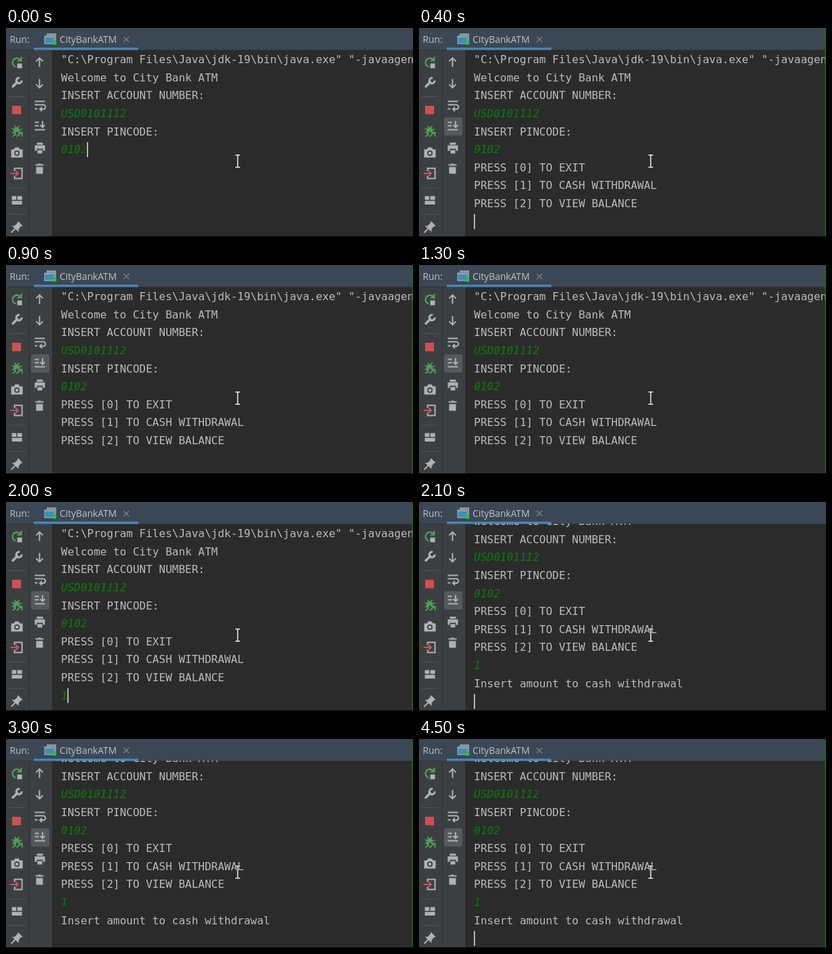
An HTML page that plays this animation: 600x309 px, repeating every 5 s.

```html
<!DOCTYPE html>
<html lang="en">
<head>
<meta charset="utf-8">
<title>Console run</title>
<style>
  html, body { margin: 0; width: 100%; height: 100%; overflow: hidden; background: #2b2b2b; }
  svg { display: block; width: 600px; height: 309px; }
  .ui { font: 13.8px "Open Sans", "Noto Sans", sans-serif; fill: #bfc1c3; }
  #lines text { font: 16px "DejaVu Sans Mono", monospace; fill: #bbb; white-space: pre; }
  #lines .input { font-style: italic; fill: #087d08; }
  .icon { fill: none; stroke: #afb1b3; stroke-width: 2; }
  .icon .solid { fill: #afb1b3; stroke: none; }
  .icon .green { stroke: #4f9d57; }
  .icon .greenFill { fill: #4f9d57; stroke: none; }
  .icon .red { stroke: #cf5356; }
  .icon .hole { fill: #3c3f41; stroke: none; }
</style>
</head>
<body>
<svg viewBox="0 0 600 309">
  <defs>
    <clipPath id="consoleArea"><path d="M68 32H600V308H68z"/></clipPath>
  </defs>
  <path fill="#2b2b2b" d="M0 0H600V309H0z"/>
  <path fill="#3b4754" d="M0 0H600V32H0z"/>
  <path fill="#3c3f41" d="M0 32H68V309H0z"/>
  <path fill="#323436" d="M0 32H600V33H0zM34 33H35V309H34z"/>
  <path fill="#4a83b8" d="M41 29H195V32.500H41z"/>
  <path fill="#515456" d="M4 101H28V102H4zM4 236.500H28V237.500H4zM4 275H28V276H4z"/>

  <text class="ui" x="5.500" y="21.800">Run:</text>
  <text class="ui" x="79" y="21.800">CityBankATM</text>
  <path stroke="#7c838a" stroke-width="1.2" d="M173.500 13l8 8M181.500 13l-8 8"/>
  <g class="icon">
    <path class="solid" fill-opacity=".75" d="M60 8H74V19H72V11H60z"/>
    <path fill="#3d8fb3" stroke="#93a4ae" stroke-width="1.3" d="M57 12H71V23H57z"/>
    <path stroke="#93a4ae" d="M57 13H71"/>
    <circle cx="71.500" cy="22" r="3" fill="#1fc93a" stroke="none"/>
  </g>

  <!-- run toolbar -->
  <g class="icon" transform="translate(.6 -.5)">
    <path class="green" stroke-width="2.300" d="M20 47A6.500 6.500 0 1 0 14 58"/>
    <path class="greenFill" d="M23 42V50H15z"/>
    <path class="solid" d="M16 53H23V60H16z"/>

    <path stroke-width="3.500" stroke-linecap="round" d="M9.500 87L16 80.500"/>
    <path stroke-width="3" d="M19.500 74.500A4 4 0 1 0 22.500 78"/>

    <path fill="#cf5053" stroke="none" d="M8.500 115.500H21.500V128H8.500z"/>

    <path class="green" stroke-width="1.700" d="M8 149l4 2M8 155h4M9 161l4-3M12 145l2 3M19 145l-2 3M23 150l-4 1"/>
    <ellipse class="greenFill" cx="15" cy="153.500" rx="4.800" ry="6.500"/>
    <path class="hole" d="M14 154H24V163H14z"/>
    <path class="green" d="M15 161l7-6M17 155h6v6"/>

    <path class="solid" d="M7 180h4l2-3h5l2 3h4v12H7z"/>
    <circle class="hole" cx="15.500" cy="185.500" r="4"/>
    <circle class="solid" cx="15.500" cy="185.500" r="2.300"/>

    <path d="M12 212V208H23V223H12V219"/>
    <path class="red" d="M6 215.500H17M13.500 211.500l4 4l-4 4"/>

    <path class="solid" d="M8 249h6.500v5.500H8zM16 249h7v5.500h-7zM8 256h15v5.500H8z"/>

    <path class="solid" d="M17 286l7 7l-3 1l-3 4v4l-10-9h4l4-4z"/>
    <path stroke-width="1.800" d="M13 297l-6 6"/>
  </g>

  <!-- console toolbar -->
  <path id="followHighlight" fill="#55595b" d="M40 132H61a3 3 0 0 1 3 3V156a3 3 0 0 1-3 3H40a3 3 0 0 1-3-3V135a3 3 0 0 1 3-3z"/>
  <g class="icon" transform="translate(-.6 -.6)">
    <path d="M50 58V45M45 50l5-5l5 5"/>
    <path d="M50 76V89M45 84l5 5l5-5"/>
    <path d="M43 109H58M43 114H55.500a3.300 3.300 0 0 1 0 6.600H51M43 120H47M53.500 117.500l-3 3.100l3 3"/>
    <path d="M43 140H49M43 145H49M43 151H58M54.500 138V147M51 144l3.500 3.500l3.500-3.500"/>
    <path class="solid" d="M46 170h9v3h-9zM43 174h15v8h-3v-3h-9v3h-3zM47 181h7v5h-7z"/>
    <path class="solid" d="M48 201h4v1h4v2.200H44V202h4zM45 206h10v10H45z"/>
  </g>

  <g clip-path="url(#consoleArea)">
    <g id="scroller">
      <g id="lines"></g>
      <path id="caret" stroke="#d8d8d8" stroke-width="1.600" d="M.5-11V11"/>
    </g>
  </g>

  <g id="pointer" fill="none" transform="translate(.6 -.8)">
    <path stroke="#222" stroke-width="3" d="M337.500 188.500h7M341 189V206M337.500 206.500h7"/>
    <path stroke="#eee" stroke-width="1.600" d="M337.500 188.500h7M341 189V206M337.500 206.500h7"/>
  </g>
  <path fill="#050505" d="M0 308H600V309H0z"/>
  <path id="edge" fill="#0a760a" d="M598.500 0H600V308H598.500z"/>
</svg>
<script>
const LOOP = 5000, PITCH = 26.6, LEFT = 81, ADVANCE = 9.632;
const PIN_DONE = 100, MENU = 300, CHOICE = 2000, SCROLL = 2100, EDGE_BACK = 3200;
const byId = id => document.getElementById(id);
const lineCenter = row => 46.4 + row * PITCH;

// [text, time it appears, typed by the user]
const output = [
  ['"C:\\Program Files\\Java\\jdk-19\\bin\\java.exe" "-javaagent', 0],
  ['Welcome to City Bank ATM', 0],
  ['INSERT ACCOUNT NUMBER:', 0],
  ['USD0101112', 0, true],
  ['INSERT PINCODE:', 0],
  ['0102', 0, true],
  ['PRESS [0] TO EXIT', MENU],
  ['PRESS [1] TO CASH WITHDRAWAL', MENU],
  ['PRESS [2] TO VIEW BALANCE', MENU],
  ['1', CHOICE, true],
  ['Insert amount to cash withdrawal', SCROLL]
];

function addText(parent, name, content) {
  const node = document.createElementNS('http://www.w3.org/2000/svg', name);
  node.textContent = content;
  return parent.appendChild(node);
}

const rows = output.map(([content, start, typed], row) => {
  const node = addText(byId('lines'), 'text', content);
  node.setAttribute('x', LEFT);
  node.setAttribute('y', lineCenter(row) + 5.7);
  if (typed) node.setAttribute('class', 'input');
  return { node, start };
});
const pin = rows[5].node;
pin.textContent = '010';
const lastDigit = addText(pin, 'tspan', '2');

const show = (node, on) => node.setAttribute('visibility', on ? 'visible' : 'hidden');

function caretCell(t) {
  if (t < MENU) return [4, 5];
  if (t < CHOICE) return [0, 9];
  return t < SCROLL ? [1, 9] : [0, 11];
}

function caretVisible(t) {
  const justMoved = t < 900 || (t >= CHOICE && t < 2900);
  return justMoved || (t + 600) % 1000 < 500;
}

function draw(t) {
  rows.forEach(({ node, start }) => show(node, t >= start));
  lastDigit.setAttribute('fill-opacity', t < PIN_DONE ? 0.55 : 1);
  show(byId('followHighlight'), t >= MENU);
  show(byId('edge'), t >= PIN_DONE && (t < SCROLL || t >= EDGE_BACK));
  byId('scroller').setAttribute('transform', `translate(0 ${t < SCROLL ? 0 : -44.5})`);
  const [column, row] = caretCell(t);
  byId('caret').setAttribute('transform', `translate(${LEFT + 0.2 + column * ADVANCE} ${lineCenter(row) + 0.4})`);
  show(byId('caret'), caretVisible(t));
}

function tick() {
  draw(performance.now() % LOOP);
  requestAnimationFrame(tick);
}
tick();
</script>
</body>
</html>
```
